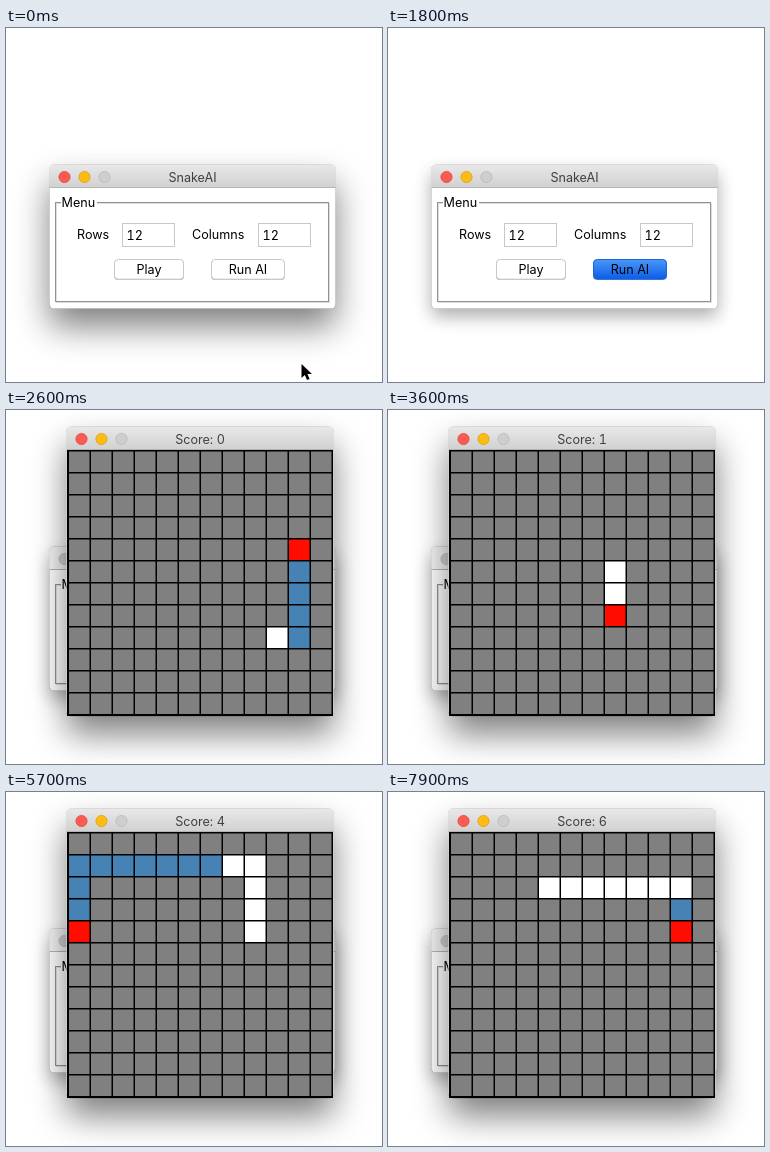
Write an HTML page that moves like this. It is 376 px wide and 354 px high and loops after 8000 ms.

```html
<!DOCTYPE html>
<html lang="en">
<head>
<meta charset="utf-8">
<title>Snake</title>
<style>
html, body { margin: 0; width: 100%; height: 100%; overflow: hidden; background: #fff; }
svg { display: block; width: 376px; height: 354px; }
text { font: 12.6px Inter, "Open Sans", sans-serif; font-feature-settings: "tnum"; }
.mid { text-anchor: middle; }
.title { fill: #404040; }
</style>
</head>
<body>
<svg id="stage" viewBox="0 0 376 354">
  <defs>
    <linearGradient id="bar" x2="0" y2="1"><stop stop-color="#e8e8e8"/><stop offset="1" stop-color="#d0d0d0"/></linearGradient>
    <linearGradient id="blue" x2="0" y2="1"><stop stop-color="#4b98f8"/><stop offset="1" stop-color="#0a5de8"/></linearGradient>
    <filter id="wide" x="-50%" y="-50%" width="200%" height="200%"><feGaussianBlur stdDeviation="17"/></filter>
    <filter id="tight" x="-50%" y="-50%" width="200%" height="200%"><feGaussianBlur stdDeviation="9"/></filter>
  </defs>
  <rect width="376" height="354" fill="#fff"/>
  <g id="menu"></g>
  <g id="game"></g>
  <path id="cursor" d="M0 0v14l3.3-3.1 2.2 5.2 2.6-1.1-2.2-5h4.6z" fill="#000" stroke="#fff" stroke-width="1" paint-order="stroke"/>
</svg>
<script>
const LOOP = 8000, TICK = 100;
const CELL = 22, SIZE = 12;
const OPEN = 19, START = 21;
const FOODS = [[10, 4], [7, 7], [5, 11], [8, 1], [0, 4], [3, 2], [10, 4]];
const $ = id => document.getElementById(id);

function el(parent, tag, attrs, text) {
  const node = document.createElementNS("http://www.w3.org/2000/svg", tag);
  for (const key in attrs) node.setAttribute(key, attrs[key]);
  if (text) node.textContent = text;
  parent.appendChild(node);
  return node;
}

const box = (parent, x, y, width, height, attrs) =>
  el(parent, "rect", { x, y, width, height, ...attrs });

function makeWindow(parent, x, y, w, h, name) {
  const shadow = box(parent, x, y + 18, w, h, { rx: 5, filter: "url(#wide)", opacity: 0.5 });
  box(parent, x - 0.5, y - 0.5, w + 1, h + 1, { rx: 5, fill: "#000", opacity: 0.2 });
  box(parent, x, y, w, h, { rx: 4.5, fill: "#fff" });
  const shape = `M${x} ${y + 23}v-18q0-5 5-5h${w - 10}q5 0 5 5v18z`;
  const bar = el(parent, "path", { d: shape, fill: "url(#bar)" });
  el(parent, "path", { d: `M${x} ${y + 22.5}h${w}`, stroke: "#b4b4b4" });
  const lights = [["#fc5b52", "#df4840"], ["#fdbc14", "#dd9f18"], ["#cecece", "#b9b9b9"]].map(([fill, stroke], i) =>
    el(parent, "circle", { cx: x + 15 + 20 * i, cy: y + 12, r: 5.6, fill, stroke, "stroke-width": 0.8 }));
  const title = el(parent, "text", { x: x + w / 2, y: y + 17, class: "mid title" }, name);
  return { shadow, bar, lights, title };
}

function makeMenu() {
  const g = $("menu");
  const win = makeWindow(g, 43.5, 137, 286, 143.5, "SnakeAI");
  box(g, 50.5, 175.5, 273, 99, { fill: "none", stroke: "#dedede" });
  box(g, 49.5, 174.5, 273, 99, { fill: "none", stroke: "#929292" });
  box(g, 55, 172, 36, 5, { fill: "#fff" });
  const label = (x, y, text) => el(g, "text", { x, y }, text);
  label(55.5, 179, "Menu");
  label(71, 211, "Rows");
  label(186, 211, "Columns");
  for (const x of [116, 252]) {
    box(g, x + 0.5, 195.5, 52, 23, { fill: "#fff", stroke: "#c8c8c8" });
    label(x + 4.5, 212, "12");
  }
  const button = (x, w, text) => {
    box(g, x, 232, w, 20, { rx: 4, fill: "#b5b5b5" });
    const face = box(g, x + 0.5, 231.5, w - 1, 19.7, { rx: 3.7, fill: "#fff", stroke: "#c9c9c9" });
    el(g, "text", { x: x + w / 2, y: 246, class: "mid" }, text);
    return face;
  };
  button(108, 70, "Play");
  win.run = button(205, 74, "Run AI");
  return win;
}

function makeGame() {
  const g = $("game");
  const win = makeWindow(g, 60.5, 17, 267, 289, "Score: 0");
  box(g, 61, 40, 266, 266, { fill: "#000" });
  win.cells = [];
  for (let i = 0; i < SIZE * SIZE; i++) {
    const x = 63 + CELL * (i % SIZE), y = 41.5 + CELL * Math.floor(i / SIZE);
    win.cells.push(box(g, x, y, 20.5, 20.5, { fill: "#808080" }));
  }
  return win;
}

const same = (a, b) => a[0] === b[0] && a[1] === b[1];

// Columns first, then rows.
function advance([x, y], [fx, fy]) {
  return x !== fx ? [x + Math.sign(fx - x), y] : [x, y + Math.sign(fy - y)];
}

function route(head, food) {
  const cells = [];
  for (let p = advance(head, food); !same(p, food); p = advance(p, food)) cells.push(p);
  return cells;
}

function playGame() {
  let snake = [[4, 8]], score = 0;
  const states = [];
  for (let k = START; k < LOOP / TICK; k++) {
    let ate = false;
    if (k > START) {
      const head = advance(snake[0], FOODS[score]);
      ate = same(head, FOODS[score]);
      snake = [head, ...snake.slice(0, ate ? undefined : -1)];
      if (ate) score++;
    }
    const food = FOODS[score];
    states.push({ snake, score, food, path: ate ? [] : route(snake[0], food) });
  }
  return states;
}

const menu = makeMenu(), game = makeGame(), states = playGame();
const lightFills = menu.lights.map(c => [c.getAttribute("fill"), c.getAttribute("stroke")]);

function drawMenu(k) {
  const lit = k < 18, active = k < OPEN;
  menu.shadow.setAttribute("y", lit ? 155 : 145);
  menu.shadow.setAttribute("filter", lit ? "url(#wide)" : "url(#tight)");
  menu.shadow.setAttribute("opacity", lit ? 0.5 : 0.32);
  menu.bar.setAttribute("fill", active ? "url(#bar)" : "#f4f4f4");
  menu.lights.forEach((c, i) => {
    c.setAttribute("fill", active ? lightFills[i][0] : "#d0d0d0");
    c.setAttribute("stroke", active ? lightFills[i][1] : "#bcbcbc");
  });
  const pressed = k >= 11 && active;
  menu.run.setAttribute("fill", pressed ? "url(#blue)" : "#fff");
  menu.run.setAttribute("stroke", pressed ? "#1b63d8" : "#c9c9c9");
}

function drawGame(k) {
  const g = $("game");
  g.setAttribute("visibility", k < OPEN ? "hidden" : "visible");
  if (k < OPEN) return;
  const [scale, opacity] = [[0.93, 0.4], [0.98, 0.8]][k - OPEN] || [1, 1];
  g.setAttribute("opacity", opacity);
  g.setAttribute("transform", `translate(194 161.5) scale(${scale}) translate(-194 -161.5)`);
  const { snake, score, food, path } = states[Math.max(0, k - START)];
  game.title.textContent = "Score: " + score;
  const paint = (list, color) => list.forEach(([x, y]) => game.cells[y * SIZE + x].setAttribute("fill", color));
  game.cells.forEach(c => c.setAttribute("fill", "#808080"));
  paint(path, "#4682b4");
  paint([food], "#ff0d00");
  paint(snake, "#fff");
}

function drawCursor(k) {
  const u = Math.min(1, k / 7), e = u * u * (3 - 2 * u);
  const [x, y] = k < 13 ? [295.5 - 43.5 * e, 336 - 87 * e] : [338, 254];
  $("cursor").setAttribute("transform", `translate(${x} ${y})`);
  $("cursor").setAttribute("visibility", k < 14 ? "visible" : "hidden");
}

function draw(time) {
  const k = Math.floor((time % LOOP) / TICK);
  drawMenu(k);
  drawGame(k);
  drawCursor(k);
}

const began = performance.now();
function loop() {
  draw(performance.now() - began);
  requestAnimationFrame(loop);
}
loop();
</script>
</body>
</html>
```
